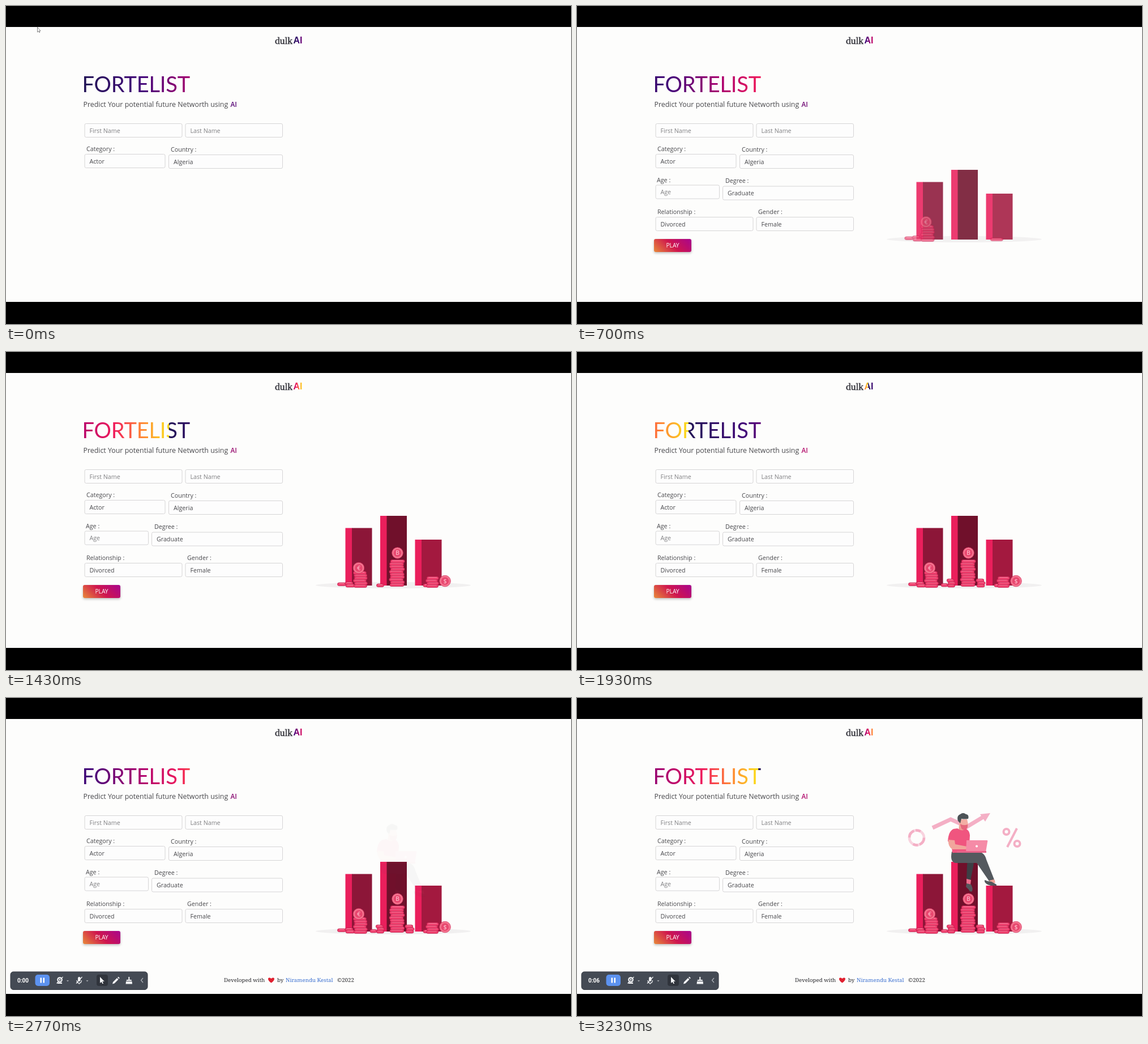
Recreate the animation shown at these times as an HTML page. Size 998x561 px, loop 3260 ms.

```html
<!DOCTYPE html>
<html lang="en">
<head>
<meta charset="utf-8">
<title>Net worth form</title>
<style>
  html, body { margin: 0; width: 100%; height: 100%; overflow: hidden; background: #000; }
  #stage { position: relative; width: 998px; height: 561px; overflow: hidden; }
  svg { position: absolute; left: 0; top: 0; }
  text { font-family: "Open Sans", sans-serif; font-size: 10.7px; fill: #48484c; }

  .flow {
    position: absolute; white-space: nowrap; color: transparent;
    background: linear-gradient(90deg, #231557, #44077a 29%, #a8006f 53%, #f01c5c 73%, #ff7a38 85%, #fce01c)
                0 0 / var(--p) 100% repeat-x;
    -webkit-background-clip: text; background-clip: text;
    animation: flow 3260ms linear infinite;
  }
  h1 { margin: 0; left: 134.5px; top: 114px; --p: 360px; --o: 2.5px;
       font: 400 38px/46px Lato, sans-serif; letter-spacing: -.2px; }
  .mark { left: 507.5px; top: 52px; --p: 36px; --o: 0px;
          font: 700 16px/18px "Liberation Sans", sans-serif; }
  @keyframes flow {
    0%, 8.59% { background-position-x: var(--o); }
    100% { background-position-x: calc(var(--o) - 1.5074 * var(--p)); }
  }

  .tint { font-weight: 600; animation: tint 3260ms linear infinite; }
  @keyframes tint {
    0%, 8.59% { fill: #5a0a78; }
    68.62% { fill: #c4106a; }
    68.63% { fill: #5a0a78; }
    100% { fill: #b40e6d; }
  }

  .box { fill: #fdfdfd; stroke: #d6d5d6; }
  .hint { fill: #808083; }
  .sub { font-size: 12.4px; }
  .logo { font: 17.5px "Liberation Serif", serif; fill: #2e2e36; stroke: #2e2e36; stroke-width: .35; }
  .foot text { font: 500 9.7px "Noto Serif", serif; fill: #28282c; }
  .foot .link { fill: #3a6fd0; }
  .time { font: 700 10px Roboto, sans-serif; fill: #fff; }
  .play { position: absolute; left: 136px; top: 411px; width: 66px; height: 23px; border-radius: 3px;
          background: linear-gradient(45deg, #e8893a, #cf164e 50%, #a8058e);
          box-shadow: 0 2px 4px rgba(0, 0, 0, .25);
          font: 10.3px/23px "Open Sans", sans-serif; color: #fff; text-align: center; }

  .step { animation: 3260ms step-end infinite; }
  .form { animation-name: form; }
  .cursor { animation-name: cursor; }
  .tail { animation-name: tail; }
  .t0 { animation-name: t0; }
  .t6 { animation-name: t6; }
  @keyframes form { 0% { opacity: 0; } 3.07%, 100% { opacity: 1; } }
  @keyframes cursor { 0% { opacity: 1; } 3.07%, 100% { opacity: 0; } }
  @keyframes tail { 0% { opacity: 0; } 82.82%, 100% { opacity: 1; } }
  @keyframes t0 { 0% { opacity: 1; } 90.5%, 100% { opacity: 0; } }
  @keyframes t6 { 0% { opacity: 0; } 90.5%, 100% { opacity: 1; } }

  .art { animation: 3260ms linear infinite; }
  .bars { animation-name: bars; }
  .c1 { animation-name: c1; }
  .c2 { animation-name: c2; }
  .c3 { animation-name: c3; }
  .man { animation-name: man; }
  .signs { animation-name: signs; }
  @keyframes bars { 0%, 13.2% { opacity: 0; } 22.7%, 100% { opacity: 1; } }
  @keyframes c1 {
    0%, 13.2% { opacity: 0; transform: translateX(-22px); animation-timing-function: ease-out; }
    29.4%, 100% { opacity: 1; transform: none; }
  }
  @keyframes c2 {
    0%, 29% { opacity: 0; transform: translateX(-22px); animation-timing-function: ease-out; }
    42.9%, 100% { opacity: 1; transform: none; }
  }
  @keyframes c3 {
    0%, 45.4% { opacity: 0; transform: translateX(-22px); animation-timing-function: ease-out; }
    58%, 100% { opacity: 1; transform: none; }
  }
  @keyframes man {
    0%, 84.7% { opacity: 0; transform: translateY(20px); animation-timing-function: ease-out; }
    97%, 100% { opacity: 1; transform: none; }
  }
  @keyframes signs { 0%, 86% { opacity: 0; } 98.5%, 100% { opacity: 1; } }
</style>
</head>
<body>
<div id="stage">
  <svg width="998" height="561" viewBox="0 0 998 561">
    <rect y="37" width="998" height="485" fill="#fdfdfc"/>
    <text class="logo" x="475" y="66.5">dulk</text>
    <text class="sub" x="136.5" y="178">Predict Your potential future Networth using</text>
    <text class="sub tint" x="396.5" y="178" style="font-size:11.8px">AI</text>
    <g id="top"></g>
    <g id="more" class="step form"></g>
    <path class="step cursor" d="M55.5 37.5v8.6l2-1.8 1.3 2.6 1-.5-1.2-2.5h2.5z" fill="#fff" stroke="#555" stroke-width=".7"/>

    <g class="art bars">
      <ellipse cx="684" cy="411.5" rx="137" ry="5.5" fill="#f1f0f0"/>
      <g id="bars"></g>
    </g>

    <g class="art signs" fill="none" stroke="#f4afc5">
      <path d="M628 229 660 214 689 227 719 209" stroke-width="7"/>
      <path d="M712 205 730 203 721 218z" fill="#f4afc5" stroke="none"/>
      <circle cx="600" cy="246.5" r="13" stroke="#f8d3df" stroke-width="4.5"/>
      <circle cx="600" cy="246.5" r="13" stroke-width="4.5" stroke-dasharray="15 3 9 14"/>
      <g stroke-width="4">
        <circle cx="758.5" cy="236" r="5"/>
        <circle cx="777.5" cy="257" r="5"/>
        <path d="M777 230 760 263"/>
      </g>
    </g>

    <g class="art man">
      <path d="M690 284q13 0 10 13l-5 25h-7l1-27z" fill="#3d3f45"/>
      <path d="M688 319 696 321 695 329 688 328z" fill="#ee6d8c"/>
      <path d="M688 327 696 329q4 7 2 12-4 2-6-3l-5-5z" fill="#54585d"/>
      <path d="M662 271h46q12 1 15 14l15 38-8 3-24-35h-36q-12 0-8-20z" fill="#54595e"/>
      <path d="M728 322 737 320 739 326 731 327z" fill="#f0a095"/>
      <path d="M720 321q6 3 12 3l9 5v2h-10q-9-2-11-7z" fill="#54585d"/>
      <path d="M675 223h10l1 12-12 1z" fill="#ed9a92"/>
      <path d="M675 214h14l2 9q0 9-7 9-8-1-9-9z" fill="#f3aea4"/>
      <path d="M677 222q5 4 13 1 1 9-6 10-7-1-7-11z" fill="#e5677c"/>
      <path d="M673 217q-3-9 4-12 5-4 10 0 6 1 4 8-7 1-12 0l-2 8z" fill="#4c5357"/>
      <path d="M672 230q10 7 14 0 7 3 8 12l-2 31h-29l-2-19-6-1q1-18 10-22z" fill="#f0557f"/>
      <path d="M656 250 667 251 668 258 689 262v5l-26 0q-8-5-7-17z" fill="#f1a59c"/>
      <path d="M688 251h36q2 0 1 3l-3 18h-35z" fill="#f58ba7"/>
      <path d="M671 270h52v3h-52z" fill="#e86389"/>
      <circle cx="706" cy="261.5" r="2" fill="#fff"/>
    </g>

    <g id="c1" class="art c1"></g>
    <g id="c2" class="art c2"></g>
    <g id="c3" class="art c3"></g>

    <g class="step tail">
      <g class="foot">
        <text x="385" y="501">Developed with</text>
        <path d="M468.5 502.5c-9-6-5.5-12 0-7.5 5.5-4.5 9 1.5 0 7.5z" fill="#e0202f"/>
        <text x="479" y="501">by</text>
        <text class="link" x="494" y="501">Niramendu Kestal</text>
        <text x="585" y="501">©2022</text>
      </g>
      <rect x="8" y="483" width="242" height="31.5" rx="5" fill="#444a54" stroke="#363b44"/>
      <text class="time step t0" x="20" y="501.5">0:00</text>
      <text class="time step t6" x="20" y="501.5">0:06</text>
      <rect x="51.5" y="488" width="25.5" height="20" rx="5" fill="#5c92f0"/>
      <path d="M60.5 493.5h2.5v9h-2.5zM65.5 493.5h2.5v9h-2.5z" fill="#fff"/>
      <rect x="160" y="488" width="20" height="20" rx="4" fill="#30343c"/>
      <g fill="#f4f5f7">
        <circle cx="95" cy="497" r="4.8"/>
        <path d="M91 502h8v2h-8z"/>
        <rect x="127" y="492" width="4.5" height="8" rx="2.2"/>
        <path d="M166 492v11l2.6-2.3 1.8 3.6 1.7-.8-1.8-3.5h3.5z"/>
        <path d="M188 504.5 189 501 196 494 198.5 496.5 191.5 503.5zM197 493 198.5 491.7 200.8 494 199.5 495.5z"/>
        <path d="M216.3 492h2v5h3l1 2h-10l1-2h3zM212 500h10.5l.5 4.5h-11.5z"/>
        <path d="M107 498h4l-2 2.5zM141.5 498h4l-2 2.5z" opacity=".55"/>
      </g>
      <g fill="none" stroke="#f4f5f7" stroke-width="1.2">
        <path d="M125 498q0 5 4.2 5t4.2-5M129.2 503v2M89.5 503.5 100.5 492M124 503.5 134.5 492"/>
        <circle cx="95" cy="497" r="2" stroke="#444a54"/>
        <path d="M242 494 238.5 498 242 502" stroke="#b0b4bb"/>
      </g>
    </g>
  </svg>
  <h1 class="flow">FORTELIST</h1>
  <span class="flow mark">AI</span>
  <div class="play step form">PLAY</div>
</div>
<script>
  const put = (id, html) => document.getElementById(id).innerHTML = html.join('');

  const label = (x, y, s, cls = '') => `<text class="${cls}" x="${x}" y="${y}">${s}</text>`;
  const field = (x, y, w, s, cls) =>
    `<rect class="box" x="${x + .5}" y="${y + .5}" width="${w - 1}" height="24" rx="2.5"/>` +
    label(x + 9, y + 16.5, s, cls);

  put('top', [
    field(138.5, 207, 173, 'First Name', 'hint'), field(316.5, 207, 172.5, 'Last Name', 'hint'),
    label(142, 256, 'Category :'), field(138.5, 261, 143, 'Actor'),
    label(291, 257, 'Country :'), field(287, 262, 202, 'Algeria')
  ]);
  put('more', [
    label(141, 311, 'Age :'), field(138.5, 315.5, 113.5, 'Age', 'hint'),
    label(262, 312, 'Degree :'), field(257, 317.5, 232, 'Graduate'),
    label(142, 367, 'Relationship :'), field(138.5, 372, 173, 'Divorced'),
    label(320, 367, 'Gender :'), field(316.5, 372, 172.5, 'Female')
  ]);

  const bar = (x, y, dark) =>
    `<path d="M${x} ${y}h12V412h-12z" fill="#ea1f5c"/><path d="M${x + 11.5} ${y}h35.5V412h-35.5z" fill="${dark}"/>`;
  put('bars', [bar(599.5, 310.5, '#8c1638'), bar(661, 289, '#70102b'), bar(722.5, 331, '#a3193f')]);

  const disc = (x, y, w) =>
    `<rect x="${x - w / 2}" y="${y - 2.5}" width="${w}" height="5.4" rx="2.7" fill="#f0416f" stroke="#b81b49" stroke-width=".7"/>` +
    `<path d="M${x - w / 2 + 3} ${y - 1}h${w - 6}" stroke="#f98aa5"/>`;
  const stack = (x, y, w, n) =>
    Array.from({ length: n }, (_, i) => disc(x + 1.2 * Math.sin(i * 2.3), y - i * 4.6, w)).join('');
  const coin = (x, y, s) =>
    `<circle cx="${x}" cy="${y}" r="9.8" fill="#f4758f" stroke="#d5325f" stroke-width=".8"/>` +
    `<circle cx="${x}" cy="${y}" r="6.8" fill="#e8476f"/>` +
    `<text x="${x}" y="${y + 3.8}" text-anchor="middle" style="fill:#fbb0c0;font-weight:600">${s}</text>`;

  put('c1', [
    disc(593, 409.5, 15), disc(606, 408, 14), disc(608, 412, 16),
    stack(626, 412.5, 23, 6), coin(623, 381, '€'), disc(748, 411.5, 22)
  ]);
  put('c2', [
    disc(661, 411.5, 13), stack(690.5, 410.5, 25, 10), coin(691.5, 354.5, 'B'),
    stack(753, 412.5, 21, 4), coin(775.5, 404, '$')
  ]);
  put('c3', [disc(649, 411, 12), stack(661, 412, 13, 3), stack(713, 412, 14, 3)]);
</script>
</body>
</html>
```
